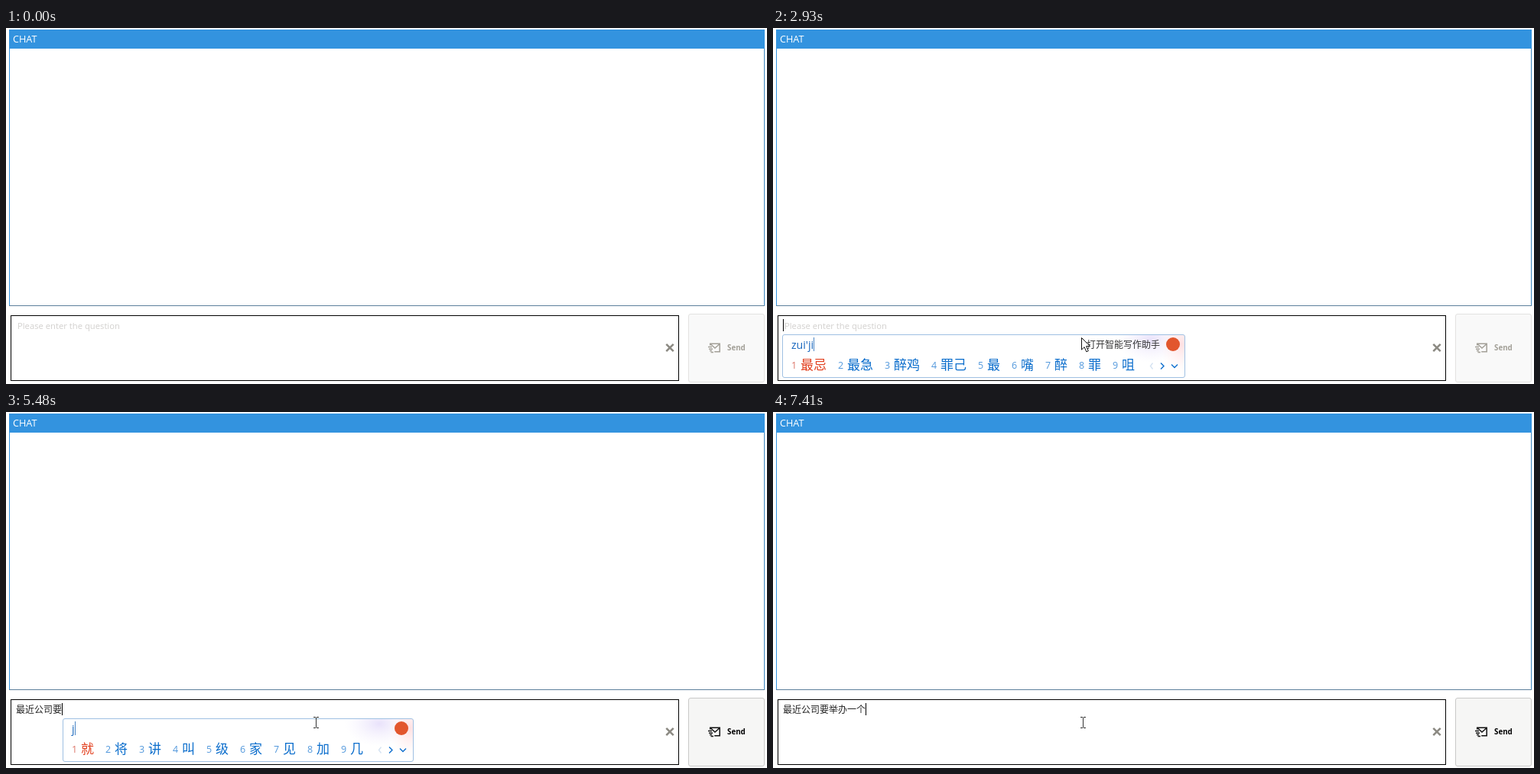
Animation, 995 px wide and 466 px high, one loop 8 s. Source, as an HTML page:

```html
<!DOCTYPE html>
<html lang="zh-CN">
<head>
<meta charset="utf-8">
<title>Chat</title>
<style>
html, body { margin: 0; width: 100%; height: 100%; overflow: hidden; background: #fff; }
svg { display: block; }
text { font-family: "Open Sans", "Noto Sans CJK SC", "Noto Sans CJK", sans-serif; white-space: pre; }
.cjk { font-family: "Noto Sans CJK SC", "Noto Sans CJK", "Noto Sans", sans-serif; }
.line { fill: none; stroke-width: 1; }
</style>
</head>
<body>
<svg id="stage" width="995" height="466" viewBox="0 0 995 466">
  <defs>
    <radialGradient id="lilac"><stop offset="0" stop-color="#e9e2fb"/><stop offset="1" stop-color="#f4f1fd" stop-opacity="0"/></radialGradient>
    <radialGradient id="pink"><stop offset="0" stop-color="#ffe0e2"/><stop offset="1" stop-color="#fff0f1" stop-opacity="0"/></radialGradient>
  </defs>
  <rect width="995" height="466" fill="#fff"/>
  <path class="line" d="M4.5 27V363.5" stroke="#3393df"/>
  <path class="line" d="M991.5 27V363.5" stroke="#3b84bd"/>
  <path class="line" d="M4 363.5H992" stroke="#5c7f9c"/>
  <rect x="4" y="2" width="988" height="25" fill="#3393df"/>
  <text x="9" y="19" font-size="12.7" fill="#fff">CHAT</text>

  <rect x="6.5" y="376.5" width="873" height="85" fill="#fff" stroke="#000"/>
  <text id="hold" x="15" y="394" font-size="11.26" fill="#d2d0ce">Please enter the question</text>
  <text id="entry" class="cjk" x="13" y="394" font-size="12" fill="#222"></text>
  <rect id="caret" y="381" width="1" height="16" fill="#000"/>
  <path d="M863.3 413.8l9.4 9.4m0-9.4l-9.4 9.4" stroke="#8b8982" stroke-width="2.5" fill="none"/>

  <rect id="button" x="892.5" y="374.5" width="99" height="89" rx="2.5"/>
  <g id="icon" fill="none" stroke-width="1.5">
    <path d="M920.7 415.5v-2.2h12.5v10.4h-7M921.3 413.8l5.7 5.2 5.8-5.2"/>
    <path d="M918 417.6h5M919 420.3h5M920 422.4h3M921.5 424.4h3.5"/>
  </g>
  <text id="label" x="943" y="422" font-size="9.8" font-weight="700">Send</text>

  <g id="popup">
    <rect id="panel" x=".5" y="401.5" height="56" rx="2.5" fill="#fff"/>
    <g id="right">
      <path d="M-92 402H-1V448H-92Z" fill="none"/>
      <svg x="-95" y="402" width="94" height="55">
        <ellipse cx="50" cy="6" rx="45" ry="30" fill="url(#lilac)"/>
        <ellipse cx="90" cy="12" rx="28" ry="38" fill="url(#pink)"/>
      </svg>
      <text id="hint" class="cjk" x="-129" y="419" font-size="12" fill="#333">打开智能写作助手</text>
      <circle cx="-16" cy="414" r="9" fill="#e2562d"/>
      <g class="line" style="stroke-width:1.4">
        <path d="M-42.5 438.5l-3 4 3 4" stroke="#d5e3f2"/>
        <path d="M-32 438.5l4 4-4 4M-18 440.5l4 4 4-4" stroke="#0f6fce"/>
      </g>
    </g>
    <rect id="frame" x=".5" y="401.5" height="56" rx="2.5" fill="none" stroke="#9fc0e2"/>
    <text id="typed" x="12" y="420" font-size="14.1" fill="#1464bd"></text>
    <rect id="bar" y="405" width="1" height="18" fill="#4c86c4"/>
    <g id="list"></g>
  </g>

  <g id="mouse">
    <path id="arrow" d="M-1.5-.5v15.6l3.6-3.5 2.7 6.2 2.5-1.1-2.7-6.1h4.9z" fill="#fff" stroke="#111"/>
    <path id="beam" class="line" d="M-3-6.5h3m1 0h3M.5-6v13M-3 7.5h3m1 0h3" stroke="#333"/>
  </g>
</svg>
<script>
const LOOP = 8000;

// time, committed text, typed letters, candidates, extra panel width
const STEPS = [
  [0, ''],
  [1500, '', 'z', '在 再 中 做 这 站 则 只 找'],
  [1630, '', 'zu', '组 足 族 租 祖 阻 卒 诅 俎'],
  [1770, '', 'zui', '最 嘴 醉 罪 追 坠 咀 赘 蕞', 12],
  [1910, '', "zui'j", '最近 最佳 最久 最简 最紧 最急 最强 最惧 罪己'],
  [2260, '', "zui'ji", '最忌 最急 醉鸡 罪己 最 嘴 醉 罪 咀'],
  [3260, '', "zui'jin", '最近 最紧 最进 最尽 醉金 最今 罪尽 最劲 嘴紧'],
  [3650, ''],
  [3730, '最近'],
  [3930, '最近', 'g', '个 过 给 改 跟 搞 刚 关 敢'],
  [4000, '最近', 'go', '够 购 狗 构 勾 沟 钩 苟 垢'],
  [4070, '最近', 'gon', '公 共 工 供 功 宫 攻 弓 贡'],
  [4140, '最近', 'gong', '公 共 工 供 功 宫 攻 弓 贡'],
  [4210, '最近', "gong's", '公司 告诉 公示 公式 工时 攻势 共识 宫商 公'],
  [4410, '最近', "gong'si", '公司 公私 工司 宫司 公 共 工 供 功'],
  [4670, '最近公司'],
  [4940, '最近公司', 'y', '有 要 已 也 与 呀 用 又 摇'],
  [5010, '最近公司', 'ya', '呀 压 牙 亚 鸭 押 雅 哑 崖'],
  [5140, '最近公司', 'yao', '要 药 摇 咬 腰 邀 耀 妖 姚', 12],
  [5280, '最近公司要'],
  [5480, '最近公司要', 'j', '就 将 讲 叫 级 家 见 加 几'],
  [5680, '最近公司要', 'ju', '据 剧 局 举 句 聚 具 巨 距'],
  [5880, '最近公司要', "ju'b", '举办 具备 剧本 局部 句被 举报 巨变 拒不 举杯'],
  [6010, '最近公司要', "ju'ba", '举把 巨霸 据吧 举 局 句 剧 巨 聚'],
  [6140, '最近公司要', "ju'ban", '举办 局办 剧版 剧 巨 局 聚 句 据'],
  [6810, '最近公司要举办'],
  [7070, '最近公司要举办', 'y', '有 要 已 也 与 呀 用 又 摇'],
  [7140, '最近公司要举办', 'yi', '一 以 已 亿 易 意 依 衣 移'],
  [7210, '最近公司要举办', "yi'g", '一个 一共 一贯 已给 一股 一国 衣柜 一刚 医改'],
  [7410, '最近公司要举办一个']
];
// moments at which the caret flips, beginning hidden
const BLINK = [760, 1300, 1770, 2330, 2860, 3390, 3730, 4270, 4670, 5210, 5280, 5880, 6410, 6540, 6810, 7340, 7410];
const HINTS = [[2860, 2930, 3260], [6410, 6540, 6810]];

const $ = id => document.getElementById(id);
const show = (id, on) => $(id).setAttribute('visibility', on ? 'inherit' : 'hidden');
const set = (id, attrs) => { for (const k in attrs) $(id).setAttribute(k, attrs[k]); };

function addText(x, y, size, color, str) {
  const el = document.createElementNS('http://www.w3.org/2000/svg', 'text');
  Object.entries({ x, y, 'font-size': size, fill: color }).forEach(([k, v]) => el.setAttribute(k, v));
  if (size > 14) el.setAttribute('class', 'cjk');
  el.textContent = str;
  $('list').append(el);
}

function drawPopup(left, typed, words, extra = 0) {
  let x = 12;
  $('list').replaceChildren();
  words.split(' ').forEach((word, i) => {
    addText(x, 446, 12.5, i ? '#5298dc' : '#dc7568', i + 1);
    addText(x + 12, 447, 17, i ? '#0a6dcc' : '#e2401f', word);
    x += 27 + 17 * word.length;
  });
  const width = x + 50 + extra;
  set('popup', { transform: `translate(${left} 0)` });
  set('panel', { width });
  set('frame', { width });
  set('right', { transform: `translate(${width + 1} 0)` });
  $('typed').textContent = typed;
  set('bar', { x: Math.round(12 + $('typed').getComputedTextLength()) });
}

function drawStep([, text, typed, words, extra]) {
  const end = 13 + 12 * text.length;
  const ready = text !== '';
  $('entry').textContent = text;
  show('hold', !ready);
  set('caret', { x: ready ? end : 13 });
  set('button', ready ? { fill: '#f6f6f5', stroke: '#c9c9c8' } : { fill: '#f9f9f9', stroke: '#e3e2e1' });
  set('icon', { stroke: ready ? '#111' : '#a3a098' });
  set('label', { fill: ready ? '#000' : '#a3a098' });
  show('popup', !!typed);
  if (typed) drawPopup(ready ? end + 1 : 12, typed, words, extra);
}

function drawMouse(t) {
  const p = Math.min(1, Math.max(0, (t - 70) / 690));
  const rest = (1 - p) ** 2;
  const arrow = t >= 1500 && t < 4670;
  show('mouse', t >= 70);
  show('arrow', arrow);
  show('beam', !arrow);
  set('mouse', { transform: `translate(${Math.round(405 + 230 * rest)} ${Math.round(406 + 31 * rest)})` });
}

function drawHint(t) {
  const span = HINTS.find(h => t >= h[0] && t < h[2]);
  set('hint', { opacity: span ? (t < span[1] ? 0.5 : 1) : 0 });
}

let current = null;
function render(t) {
  const step = STEPS.findLast(s => s[0] <= t);
  if (step !== current) drawStep(current = step);
  const flips = BLINK.filter(b => b <= t).length;
  // a commit always restarts the blink, so the caret is solid after it
  const solid = [[3730, 4270], [4670, 5210], [5280, 5880], [6810, 7340], [7410, LOOP]].some(([a, b]) => t >= a && t < b);
  show('caret', t < 3650 ? flips % 2 : solid || (t >= 6410 && t < 6810));
  drawMouse(t);
  drawHint(t);
}

const start = performance.now();
function tick() {
  render((performance.now() - start) % LOOP);
  requestAnimationFrame(tick);
}
tick();
</script>
</body>
</html>
```
